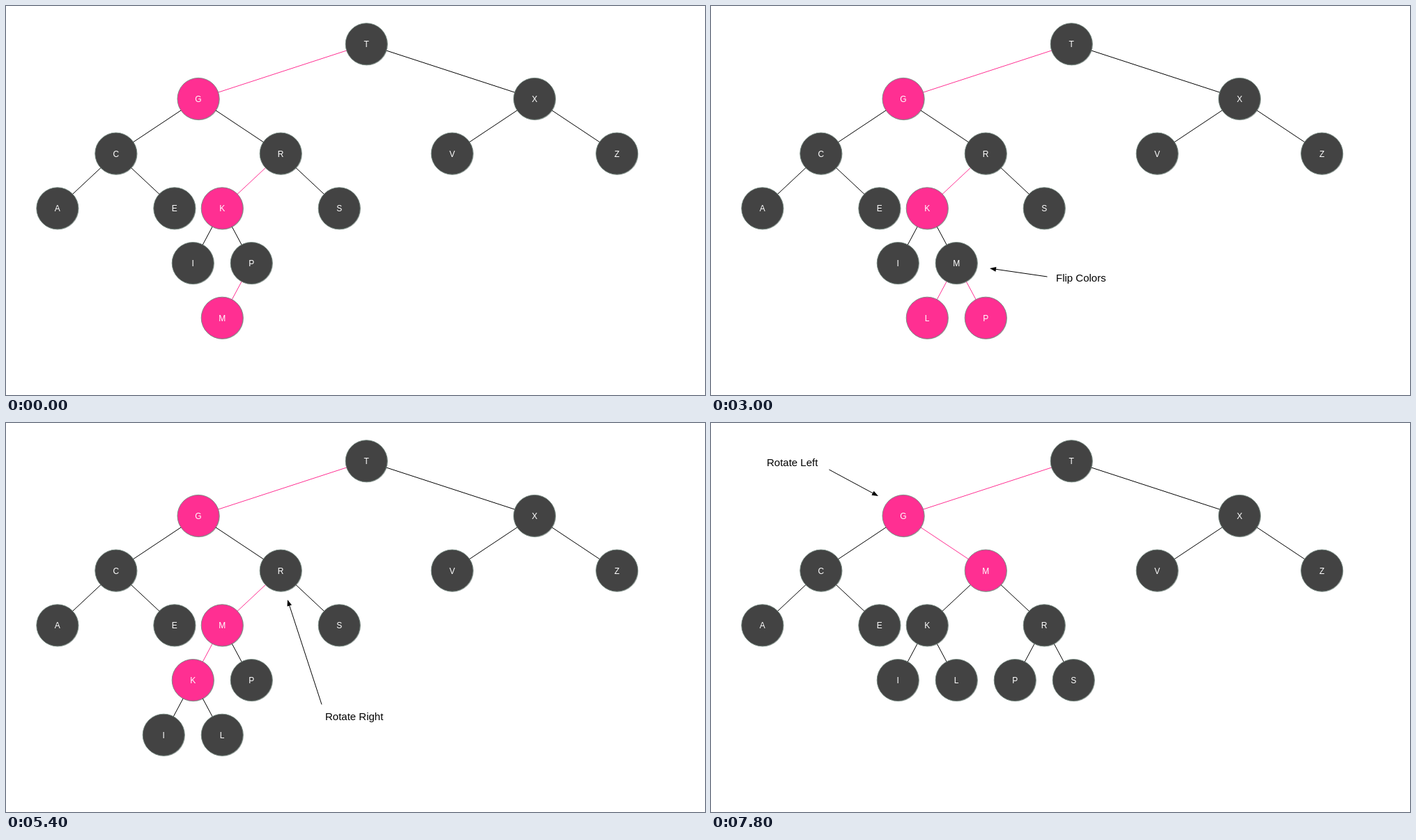
An HTML page with a canvas that plays this animation: 1003x559 px, repeating every 8 s.

```html
<!DOCTYPE html>
<html lang="en">
<head>
<meta charset="utf-8">
<title>Tree insertion</title>
<style>
html, body { margin: 0; width: 100%; height: 100%; overflow: hidden; background: #fff; }
canvas { display: block; }
</style>
</head>
<body>
<canvas id="stage" width="1003" height="559"></canvas>
<script>
const ctx = document.getElementById('stage').getContext('2d');
const LOOP = 8000, STEP = 600;
const DARK = '#434343', PINK = '#ff2f92';
const FONT = '"Liberation Sans", Arial, sans-serif';
const RADIUS = 30, ROW = 78.7;
const SPREAD = [241.2, 118.2, 84, 42, 42, 42];

// Each stage: the right subtree of G (* marks a red link) and its note:
// text, text x, baseline, arrow tail x, y, arrow tip x, y.
const STAGES = [
  ['R(*K(I,P(*M)),S)', ['Insert L', 369, 501, 356, 497, 272, 508]],
  ['R(*K(I,P(*M(*L))),S)', ['Rotate Right', 442, 453, 456, 432, 394, 398]],
  ['R(*K(I,M(*L,*P)),S)', ['Flip Colors', 495, 395.5, 482.5, 389, 400, 377]],
  ['R(*K(I,*M(L,P)),S)', ['Rotate Left', 507, 388, 503, 391.5, 352, 306]],
  ['R(*M(*K(I,L),P),S)', ['Rotate Right', 458, 427, 453, 404.5, 404, 254]],
  ['M(*K(I,L),*R(P,S))', ['Flip Colors', 537, 238, 524, 232, 442, 219]],
  ['*M(K(I,L),R(P,S))', ['Rotate Left', 80, 62, 169.5, 67, 240, 105]]
].map(([sub, note]) => ({ tree: layout(`T(*G(C(A,E),${sub}),X(V,Z))`), note }));

// Parses the tree text into a flat list of placed nodes.
function layout(text) {
  const nodes = [];
  let i = 0;
  function read(parent, depth, side) {
    const red = text[i] === '*';
    if (red) i++;
    const node = {
      key: text[i++], red, parent,
      x: parent ? parent.x + side * SPREAD[depth - 1] : 517.2,
      y: 54.7 + depth * ROW
    };
    nodes.push(node);
    if (text[i] !== '(') return;
    for (let s = -1; text[i] !== ')'; s = 1) {
      i++;
      read(node, depth + 1, s);
    }
    i++;
  }
  read(null, 0, 0);
  return nodes;
}

function line(x1, y1, x2, y2, color) {
  ctx.strokeStyle = color;
  ctx.lineWidth = 1;
  ctx.beginPath();
  ctx.moveTo(x1, y1);
  ctx.lineTo(x2, y2);
  ctx.stroke();
}

function disc(x, y, r, color) {
  ctx.fillStyle = color;
  ctx.beginPath();
  ctx.arc(x, y, r, 0, Math.PI * 2);
  ctx.fill();
}

function drawNode({ x, y, key, red }) {
  disc(x + 0.8, y + 0.8, RADIUS, 'rgba(0,0,0,.25)');
  disc(x, y, RADIUS, red ? PINK : DARK);
  ctx.strokeStyle = '#71857c';
  ctx.lineWidth = 0.9;
  ctx.stroke();
  ctx.fillStyle = '#fff';
  ctx.font = `12px ${FONT}`;
  ctx.textAlign = 'center';
  ctx.fillText(key, x, y + 4.6);
}

function drawNote([text, x, y, x1, y1, x2, y2]) {
  ctx.fillStyle = '#000';
  ctx.font = `15px ${FONT}`;
  ctx.textAlign = 'left';
  ctx.fillText(text, x, y);

  const a = Math.atan2(y2 - y1, x2 - x1);
  line(x1, y1, x2 - 6 * Math.cos(a), y2 - 6 * Math.sin(a), '#000');
  ctx.save();
  ctx.translate(x2, y2);
  ctx.rotate(a);
  ctx.beginPath();
  ctx.moveTo(0, 0);
  ctx.lineTo(-9, -3.4);
  ctx.lineTo(-9, 3.4);
  ctx.fill();
  ctx.restore();
}

function draw(now) {
  const step = Math.floor((now % LOOP) / STEP);
  const { tree, note } = STAGES[step >> 1];
  ctx.fillStyle = '#fff';
  ctx.fillRect(0, 0, 1003, 559);
  for (const { x, y, red, parent: p } of tree) {
    if (p) line(p.x, p.y, x, y, red ? PINK : '#000');
  }
  tree.forEach(drawNode);
  if (step % 2) drawNote(note);
}

const start = performance.now();
function tick() {
  draw(performance.now() - start);
  requestAnimationFrame(tick);
}
tick();
</script>
</body>
</html>
```
